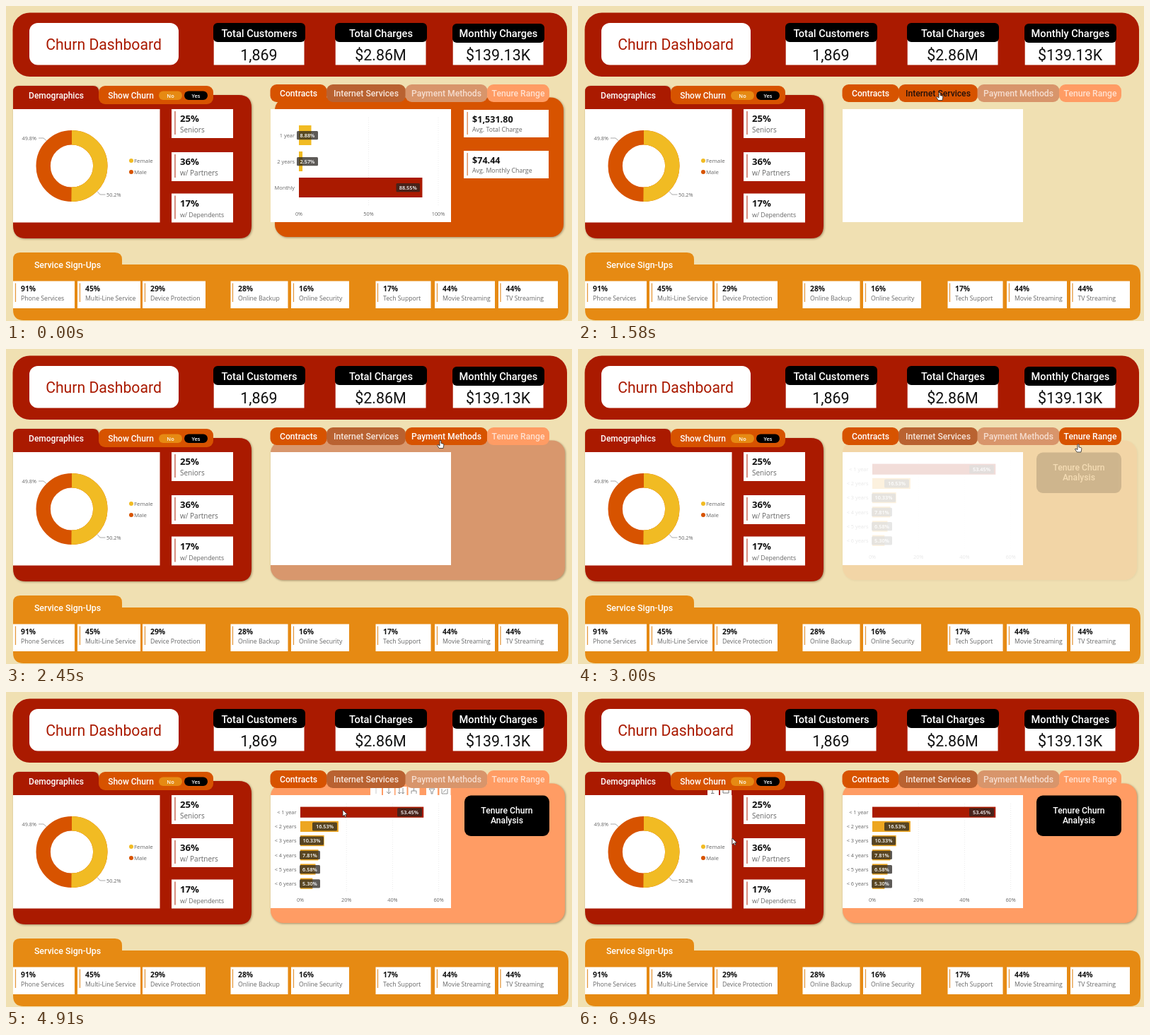
Recreate the animation shown at these times as an HTML page. Size 800 by 446 pixels, loop 6.97 s.

```html
<!DOCTYPE html>
<html lang="en">
<head>
<meta charset="utf-8">
<title>Churn Dashboard</title>
<style>
html, body { margin: 0; width: 100%; height: 100%; overflow: hidden; background: #f0e0b2; }
svg { display: block; width: 800px; height: 446px; }
text { font-family: "Open Sans", "Noto Sans", sans-serif; white-space: pre; }
.din { font-family: Roboto, sans-serif; }
.shadow { filter: drop-shadow(1.5px 1.5px 1.5px rgba(70, 40, 10, .45)); }
</style>
</head>
<body>
<svg id="stage" viewBox="0 0 800 446" xmlns="http://www.w3.org/2000/svg"></svg>
<script>
const LOOP = 6970;
const RED = '#aa1a00', ORANGE = '#d75300', AMBER = '#e68a13', YELLOW = '#f1bb23', GOLD = '#eda621',
      BROWN = '#b96231', TAN = '#d8956b', PEACH = '#ff9c64', GREY = '#666';

// Boxes are given by their edges: left, top, right, bottom.
const box = (l, t, r, b, fill, radius = 0, extra = '') =>
  `<rect x="${l}" y="${t}" width="${r - l}" height="${b - t}" rx="${radius}" fill="${fill}" ${extra}/>`;

const text = (x, y, s, size, fill, { weight = 400, anchor = 'start', din = false } = {}) =>
  `<text x="${x}" y="${y}" font-size="${size}" fill="${fill}" font-weight="${weight}" text-anchor="${anchor}"${din ? ' class="din"' : ''}>${s}</text>`;

const heading = (x, y, s, size = 12.1, fill = '#fff') =>
  text(x, y, s, size, fill, { weight: 500, anchor: 'middle', din: true });

const path = (d, stroke, width = 1) =>
  `<path d="${d}" fill="none" stroke="${stroke}" stroke-width="${width}"/>`;

const group = (id, body) => `<g id="${id}">${body}</g>`;

function kpi(l, t, title, value) {
  return box(l + .7, 48, l + 128.5, 83.5, '#fff') + box(l, t, l + 130, t + 27, '#000', 6) +
    heading(l + 65, 44, title, 14.6) +
    text(l + 64.5, 77, value, 21.4, '#111', { anchor: 'middle', din: true });
}

function header() {
  return box(9.5, 9.5, 793, 100, RED, 24) + box(33, 24, 244, 83.5, '#fff', 12) +
    text(138, 62, 'Churn Dashboard', 21.2, RED, { anchor: 'middle', din: true }) +
    kpi(293, 24, 'Total Customers', '1,869') +
    kpi(465, 24, 'Total Charges', '$2.86M') +
    kpi(631, 25, 'Monthly Charges', '$139.13K');
}

function demoCard(t, value, label, size) {
  return box(234, t, 321, t + 41, '#fff') + box(238.3, t + 3, 239.6, t + 36, '#c2523c') +
    text(246, t + 18.3, value, 13.2, '#111', { weight: 700 }) +
    text(246, t + 33.2, label, size, GREY);
}

function donut() {
  const ring = 'cx="93" cy="226.5" r="40.3" fill="none" stroke-width="20.4"';
  return box(10, 146, 217.5, 306.5, '#fff') +
    `<circle ${ring} stroke="${ORANGE}"/>` +
    `<circle ${ring} stroke="${YELLOW}" pathLength="100" stroke-dasharray="50.2 49.8" transform="rotate(-90 93 226.5)"/>` +
    path('M46 187H53L57 190.5M129 262.5L133 267H140.500', '#aaa') +
    text(22.5, 190, '49.8%', 7.3, GREY) + text(142, 270, '50.2%', 7.3, GREY) +
    `<circle cx="177" cy="219" r="3" fill="${YELLOW}"/><circle cx="177" cy="235" r="3" fill="${ORANGE}"/>` +
    text(181, 222, 'Female', 7.9, GREY) + text(181, 238, 'Male', 7.9, GREY);
}

function pill(l, fill, label) {
  return box(l, 120.5, l + 33, 133, fill, 6.2) +
    text(l + 16.5, 129.7, label, 7.4, '#fff', { weight: 600, anchor: 'middle' });
}

function demographics() {
  const tools = box(183, 136, 199, 146.5, '#fff') + box(201, 136, 217, 146.5, '#fff') +
    path('M190 138V143.500M188 143.500H192.500M205 138V143H213V138', '#777');
  return `<path class="shadow" fill="${RED}" d="M10 121Q10 113 18 113H123Q131 113 131 121V126H329Q347 126 347 144V311Q347 329 329 329H28Q10 329 10 311Z"/>` +
    group('donutTools', tools) + donut() +
    box(131, 113, 293, 139, ORANGE, 9) +
    heading(71, 130.5, 'Demographics', 12) + heading(176.5, 130.5, 'Show Churn', 12) +
    pill(216, AMBER, 'No') + pill(252, '#000', 'Yes') +
    demoCard(146, '25%', 'Seniors', 10) +
    demoCard(207, '36%', 'w/ Partners', 10) +
    demoCard(265.5, '17%', 'w/ Dependents', 8.75);
}

function services() {
  const cards = [
    [10, 97, 21, '91%', 'Phone Services'], [101, 190, 112, '45%', 'Multi-Line Service'],
    [193, 282, 204, '29%', 'Device Protection'], [317.5, 398.5, 328, '28%', 'Online Backup'],
    [403, 485, 414, '16%', 'Online Security'], [522.5, 600.5, 533, '17%', 'Tech Support'],
    [606, 691, 617, '44%', 'Movie Streaming'], [696, 780, 706.5, '44%', 'TV Streaming']
  ];
  return `<path fill="${AMBER}" d="M10 359Q10 349 20 349H154Q164 349 164 359V366H780Q795 366 795 381V430Q795 445 780 445H25Q10 445 10 430Z"/>` +
    heading(87, 371, 'Service Sign-Ups', 12.4) +
    cards.map(([l, r, x, value, label]) =>
      box(l, 389.5, r, 428, '#fff') + box(x - 8.2, 392.5, x - 6.9, 419, '#e5993f') +
      text(x, 403.7, value, 10.3, '#111', { weight: 700 }) +
      text(x, 416.5, label, 8.7, GREY)).join('');
}

const panel = (l, r, fill) => box(l, 129.5, r, 327, fill, 18, 'class="shadow"');

// Bar rows: category, value, top, height, tag left, tag right.
function barChart(x0, unit, rows, ticks, catX, minor) {
  const grid = ticks.slice(1).map(v => `<path d="M${x0 + v * unit} 158V284" stroke="#e6e6e6" stroke-width=".8" stroke-dasharray="1 2"/>`);
  const axis = ticks.map(v => text(x0 + v * unit, 296.8, v + '%', 7.3, GREY, { anchor: 'middle' }));
  const big = Math.max(...rows.map(r => r[1]));
  const bars = rows.map(([cat, v, top, h, l, r]) => {
    const mid = top + h / 2;
    return text(catX, mid + 2.7, cat, 7.4, GREY, { anchor: 'end' }) +
      box(x0, top, x0 + v * unit, top + h, v === big ? RED : minor) +
      box(l, mid - 6, r, mid + 6.2, '#2a2622', 1.5, 'fill-opacity=".76"') +
      text((l + r) / 2, mid + 2.8, v.toFixed(2) + '%', 7.3, '#fff', { weight: 600, anchor: 'middle' });
  });
  return [...grid, ...axis, ...bars].join('');
}

function chargeCard(t, value, label) {
  return box(647, t, 767, t + 39, '#fff') + box(651.5, t + 3, 652.8, t + 35, '#d9804a') +
    text(659, t + 17.7, value, 12.6, '#111', { weight: 700 }) +
    text(659, t + 30.6, label, 8.8, GREY);
}

const contractChart = () => barChart(414, 1.97, [
  ['1 year', 8.88, 169, 28, 411, 441],
  ['2 years', 2.57, 206, 28, 411, 441],
  ['Monthly', 88.55, 243, 28, 551.5, 585]
], [0, 50, 100], 408, YELLOW) +
  chargeCard(147, '$1,531.80', 'Avg. Total Charge') +
  chargeCard(205, '$74.44', 'Avg. Monthly Charge');

const tenureChart = () => barChart(416, 3.26, [
  [53.45, 553, 588], [16.53, 433, 468], [10.33, 415, 449],
  [7.81, 415, 444], [6.58, 415, 444], [5.3, 415, 444]
].map(([v, l, r], i) => [`&lt; ${i + 1} year${i ? 's' : ''}`, v, 162.6 + i * 20.2, 15.2, l, r]),
  [0, 20, 40, 60], 410.5, GOLD) +
  box(648, 146.5, 768, 204, '#000', 9) +
  heading(708, 172, 'Tenure Churn', 12.2) + heading(708, 186, 'Analysis', 12.2);

function chartTools() {
  const icons = 'M541 136V144M538 141L541 144L544 141M556 136V144M561 136V144' +
    'M554 142L556 144L558 142M559 142L561 144L563 142M576.500 136V140M573 144V140H580V144' +
    'M598 137H606L603 141V144H601V141ZM616 137V144H624V137M618 142L622 138';
  return [515, 533, 550.5, 568.5, 594, 612.5].map(x => box(x, 134, x + 16, 146.5, '#fff')).join('') +
    path('M523 136V144', '#ccc') + path(icons, '#777', .8);
}

const tabs = [
  ['Contracts', 373.5, 453.5, ORANGE, '#fff'],
  ['Internet Services', 453, 565, BROWN, '#f6e4d9'],
  ['Payment Methods', 564.5, 680.5, TAN, '#f6ddcf'],
  ['Tenure Range', 680, 768, PEACH, '#ffe0cf']
];

const views = [
  [panel(380, 788, ORANGE), contractChart()],
  [panel(374, 790, BROWN), ''],
  [panel(374, 790, TAN), ''],
  [panel(374, 790, PEACH), tenureChart()]
];

const arrow = '<path d="M0 0V9L2.200 7L3.600 10.200L5 9.600L3.600 6.500H6.500Z" fill="#fff" stroke="#222" stroke-width=".7"/>';
const hand = '<path d="M-1 .8Q0-.4 1 .8V4.500L4 5.200Q5 5.500 4.800 7L4 11.500H-1.800L-4.500 7.500Q-4.300 6.200-3 6.800L-1 8Z" fill="#fff" stroke="#222" stroke-width=".8"/>';

const stage = document.getElementById('stage');
stage.innerHTML = box(0, 0, 800, 446, '#f0e0b2') + header() + demographics() + services() +
  views.map((v, i) => group('panel' + i, v[0])).join('') +
  group('chartTools', chartTools()) +
  group('chartBox', box(374, 146, 629, 306, '#fff')) +
  views.map((v, i) => group('content' + i, v[1])).join('') +
  tabs.map(([name, l, r, fill, ink], i) => group('tab' + i,
    box(l, 111, r, 136, fill, 9) + heading((l + r) / 2, 128, name, 12.15, ink))).join('') +
  group('cursor', group('arrow', arrow) + group('hand', hand));

const el = id => document.getElementById(id);
const show = (id, on) => el(id).setAttribute('opacity', +on);

// Pointer stops: time, x, y.
const stops = [
  [500, 560, 262], [1150, 511, 122], [1620, 511, 122], [2060, 614, 129], [2460, 614, 129],
  [2840, 707, 134.5], [3080, 707, 134.5], [3600, 521, 167], [3950, 521, 167],
  [4800, 476, 167], [5700, 476, 167], [6750, 218, 207], [LOOP, 218, 207]
];
// Click time, start and end of the fade for each view.
const clicks = [[-300, -200, -100], [1460, 1580, 1760], [2160, 2290, 2470], [2880, 2945, 3180]];

const ease = u => u * u * (3 - 2 * u);
const clamp = u => Math.min(1, Math.max(0, u));

function pointer(t) {
  if (t < stops[0][0]) return null;
  const i = stops.findIndex(s => s[0] > t);
  const [t0, x0, y0] = stops[i - 1], [t1, x1, y1] = stops[i];
  const u = ease((t - t0) / (t1 - t0));
  return [x0 + (x1 - x0) * u, y0 + (y1 - y0) * u];
}

const inside = (p, l, t, r, b) => !!p && p[0] >= l && p[0] < r && p[1] >= t && p[1] < b;

function draw(t) {
  const p = pointer(t);
  const active = clicks.filter(c => c[0] <= t).length - 1;
  const [, from, to] = clicks[active];
  const alpha = ease(clamp((t - from) / (to - from)));
  views.forEach((_, i) => {
    show('panel' + i, i === active ? alpha : 0);
    show('content' + i, i === active ? alpha : 0);
  });
  el('chartBox').setAttribute('transform', t < from ? 'translate(-1.5 -.5)' : '');

  let over = false;
  tabs.forEach(([, l, r, fill, ink], i) => {
    const hot = inside(p, l, 111, r, 136);
    const [rect, label] = el('tab' + i).children;
    over = over || hot;
    rect.setAttribute('fill', hot ? ORANGE : fill);
    label.setAttribute('fill', !hot ? ink : i === 1 ? '#24100a' : '#fff');
  });

  show('chartTools', alpha === 1 && inside(p, 374, 146, 629, 306));
  show('donutTools', inside(p, 10, 146, 220, 306));
  show('cursor', !!p);
  show('hand', over);
  show('arrow', !over);
  if (p) el('cursor').setAttribute('transform', `translate(${p[0]} ${p[1]})`);
}

const start = performance.now();
function tick() {
  draw((performance.now() - start) % LOOP);
  requestAnimationFrame(tick);
}
tick();
</script>
</body>
</html>
```
